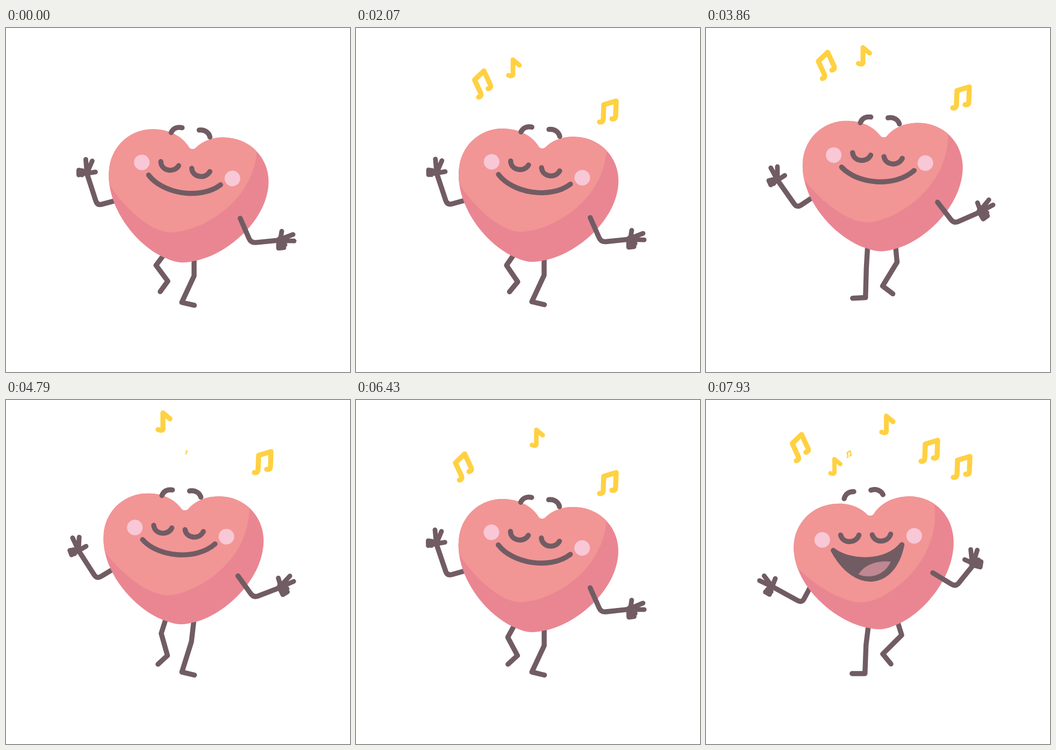
An HTML page for the animation above (8 s loop, 640x640 px).

```html
<!DOCTYPE html>
<html lang="en">
<head>
<meta charset="utf-8">
<title>Dancing heart</title>
<style>
  html, body { margin: 0; width: 100%; height: 100%; overflow: hidden; background: #fff; }
  svg { display: block; width: 100vw; height: 100vh; }
  .line, .note { fill: none; stroke: #715c63; stroke-width: 9.4; stroke-linecap: round; stroke-linejoin: round; }
  .note { stroke: #ffd142; }
  .cheek { fill: #f8c8d7; }
</style>
</head>
<body>
<svg viewBox="0 0 640 640">
  <defs>
    <path id="shape" d="M0-182C-4-182-6-184-8-187C-20-201-40-211-66-211C-112-211-149-176-149-128C-149-56-78 12-24 25.500C-15 28.500-7 30 0 30C7 30 15 28.500 24 25.500C78 12 149-56 149-128C149-176 112-211 66-211C40-211 20-201 8-187C6-184 4-182 0-182Z"/>
    <clipPath id="clip"><use href="#shape"/></clipPath>
  </defs>
  <g class="line">
    <path id="legL"/>
    <path id="legR"/>
    <path id="armL"/>
    <path id="handL" stroke-width="8.800" d="M0 0L16-2.500M0 0L10-23M0 0L-2-26M-2-3L-15-6V3L-2 0M-9-5V3"/>
  </g>
  <g id="heart">
    <use href="#shape" fill="#ea8692"/>
    <path clip-path="url(#clip)" fill="#f29595" d="M-146-100C-122-70-70-24-28-23C20-24 122-86 120-190V-230H-170V-130Z"/>
    <g id="face">
      <circle class="cheek" cx="-85.600" r="14.500"/>
      <circle class="cheek" cx="85.600" r="14.500"/>
      <path class="line" d="M-51-7.600C-48 9-23 10-17-6M7.800-5.300C12 11 36 11 42-5.200"/>
      <path class="line" id="brows" d="M-40.500-64.200C-38-73-31-77-22-76.500M10-77.800C20-81 29-76 32-68.500"/>
      <path class="line" id="mouth" style="fill:#715c63"/>
      <path id="tongue" fill="#bf8791" d="M-21 67C-10 50 14 42 40 46C32 62 18 70 3 71.500C-6 72-14 71-21 67Z"/>
    </g>
  </g>
  <g class="line">
    <path id="armR"/>
    <path id="handR" stroke-width="8.800" d="M0 0L6-5L8-17M0 0L29-11M0 0L31 1M2 2L2 14.500L12 13.500M3 8L14 8M5 4L11 12"/>
  </g>
  <g id="notes"></g>
</svg>
<script>
const LOOP = 8000, BEAT = 1100;
const $ = id => document.getElementById(id);
const put = (el, name, value) => el.setAttribute(name, value);
const mix = (a, b, k) => a + (b - a) * k;
// Progress from 0 to 1 between two times, plain and eased.
const span = (t, from, to) => Math.max(0, Math.min(1, (t - from) / (to - from)));
const ease = (t, from, to) => { const u = span(t, from, to); return u * u * (3 - 2 * u); };
const polar = ([x, y], deg, len) => {
  const r = deg * Math.PI / 180;
  return [x + Math.cos(r) * len, y + Math.sin(r) * len];
};

// One beat leans the body to the other side: rise, hop, land on the other foot.
function dance(time) {
  const t = time % BEAT, odd = Math.floor(time / BEAT) % 2;
  const flip = v => odd ? 1 - v : v;
  const land = ease(t, 740, 1010);
  return {
    lean: flip(1 - (1 - span(t, 160, BEAT) ** 1.5) ** 3),
    step: flip(.46 * span(t, 0, 800) ** 2 + .54 * land),
    bottom: 415.5 + 20.5 * (1 - ease(t, 0, 480) + land)
  };
}

// The knee bends outwards as the hip and the ankle come closer.
function drawLeg(id, side, hip, ankle, reach, lift, flat) {
  const bend = .4 * (reach - ankle[1] + hip[1]);
  const knee = [(hip[0] + ankle[0]) / 2 + side * bend, (hip[1] + ankle[1]) / 2 - 1];
  const pitch = mix(flat, 54, lift * lift);
  const toe = polar(ankle, side > 0 ? pitch : 180 - pitch, 24);
  put($(id), 'd', `M${hip}L${knee} ${ankle} ${toe}`);
}

function drawArm(side, shoulder, upper, upperLen, fore, foreLen, turn) {
  const elbow = polar(shoulder, upper, upperLen);
  const wrist = polar(elbow, fore, foreLen);
  put($('arm' + side), 'd',
    `M${shoulder}L${polar(elbow, upper, -9)}Q${elbow} ${polar(elbow, fore, 9)}L${wrist}`);
  put($('hand' + side), 'transform', `translate(${wrist}) rotate(${turn})`);
}

const single = { d: 'M-9 15C-2 18 1 16 0 10V-16L13-5', life: 5100, pulse: .05 };
const double = { d: 'M-17 20C-12 21-10 18-10 13L-9-12L14-19L13 8C13 13 11 15 6 14', life: 4450, pulse: 0 };

// Where each note pops up, and its drift in pixels per second.
const notes = [
  { kind: double, turn: -27, born: 200, x: 246.3, y: 139.2, vx: -6.5, vy: -19.3 },
  { kind: single, turn: 0, born: 150, x: 292, y: 98, vx: 0, vy: -12.5 },
  { kind: double, turn: 0, born: 1450, x: 468, y: 164, vx: 3.3, vy: -14.7 },
  { kind: single, turn: 0, born: 4650, x: 335.5, y: 99.4, vx: 0, vy: -16.5 },
  { kind: double, turn: -27, born: 5200, x: 218.5, y: 153, vx: -16.3, vy: -24 },
  { kind: double, turn: 0, born: 5800, x: 467, y: 166.6, vx: 4.7, vy: -20 },
  { kind: double, turn: 0, born: 6850, x: 410.5, y: 115.6, vx: 6, vy: -20 },
  { kind: single, turn: 0, born: 7540, x: 241.7, y: 129, vx: -7, vy: -14 },
  { kind: double, turn: -14, born: 7760, x: 267, y: 103, vx: -7, vy: -15 }
];
for (const note of notes) {
  note.el = document.createElementNS('http://www.w3.org/2000/svg', 'path');
  put(note.el, 'class', 'note');
  put(note.el, 'd', note.kind.d);
  $('notes').append(note.el);
}

function drawNote({ el, kind, turn, born, x, y, vx, vy }, t) {
  const age = t - born, s = age / 1000;
  const pulse = 1 - kind.pulse * (1 - Math.cos((t - 790) * Math.PI / 2000));
  const size = pulse * ease(age, 0, 500) * (1 - ease(age, kind.life - 400, kind.life));
  put(el, 'visibility', size > .01 ? 'visible' : 'hidden');
  put(el, 'transform', `translate(${x + vx * s} ${y + vy * s}) rotate(${turn}) scale(${size})`);
}

// The mouth is two curves, there and back; closed, both follow the smile.
const SMILE = [-69, 21, -38, 50, 33, 51, 66, 15.5, 33, 51, -38, 50, -69, 21];
const SING = [-66, 20.5, -36, 46, 32, 50, 62, 15.5, 42, 95, -28, 98, -66, 20.5];

function drawFace(open, tilt) {
  const m = SMILE.map((v, i) => mix(v, SING[i], open));
  put($('face'), 'transform', `translate(${-6.8 + .33 * tilt} -141.5) rotate(3.35)`);
  put($('mouth'), 'd', `M${m.slice(0, 2)}C${m.slice(2, 8)}C${m.slice(8)}Z`);
  put($('tongue'), 'opacity', ease(open, .5, 1));
  put($('brows'), 'transform', `translate(-1 ${-10.6 * open})`);
}

function draw(t) {
  const { lean, step, bottom } = dance(t);
  const tilt = mix(6.7, -6.7, lean), cy = bottom - 30, hipY = bottom - 22;
  const rad = tilt * Math.PI / 180, c = Math.cos(rad), s = Math.sin(rad);
  const onHeart = (x, y) => [325 + x * c - y * s, cy + x * s + y * c];
  const ankleY = lift => mix(510.5, 471, lift);

  put($('heart'), 'transform', `translate(325 ${cy}) rotate(${tilt})`);
  drawFace(ease(t, 7300, 7700), tilt);

  drawLeg('legL', -1, [302 - .35 * tilt, hipY], [mix(301, 295.5, step), ankleY(1 - step)], 110, 1 - step, 0);
  drawLeg('legR', 1, [352 - .3 * tilt, hipY], [mix(327, 329, step), ankleY(step)], 125, step, 13);
  drawArm('L', onHeart(-115.5, -76), mix(165, 115, lean), 51, mix(252, 206, lean), 63, -64 * lean);
  drawArm('R', onHeart(104, -64.5), mix(66.5, 29, lean), 50, mix(-5.5, -54, lean), 49.5, -80 * lean);
  for (const note of notes) drawNote(note, t);
}

const start = performance.now();
function tick() {
  draw((performance.now() - start) % LOOP);
  requestAnimationFrame(tick);
}
tick();
</script>
</body>
</html>
```
